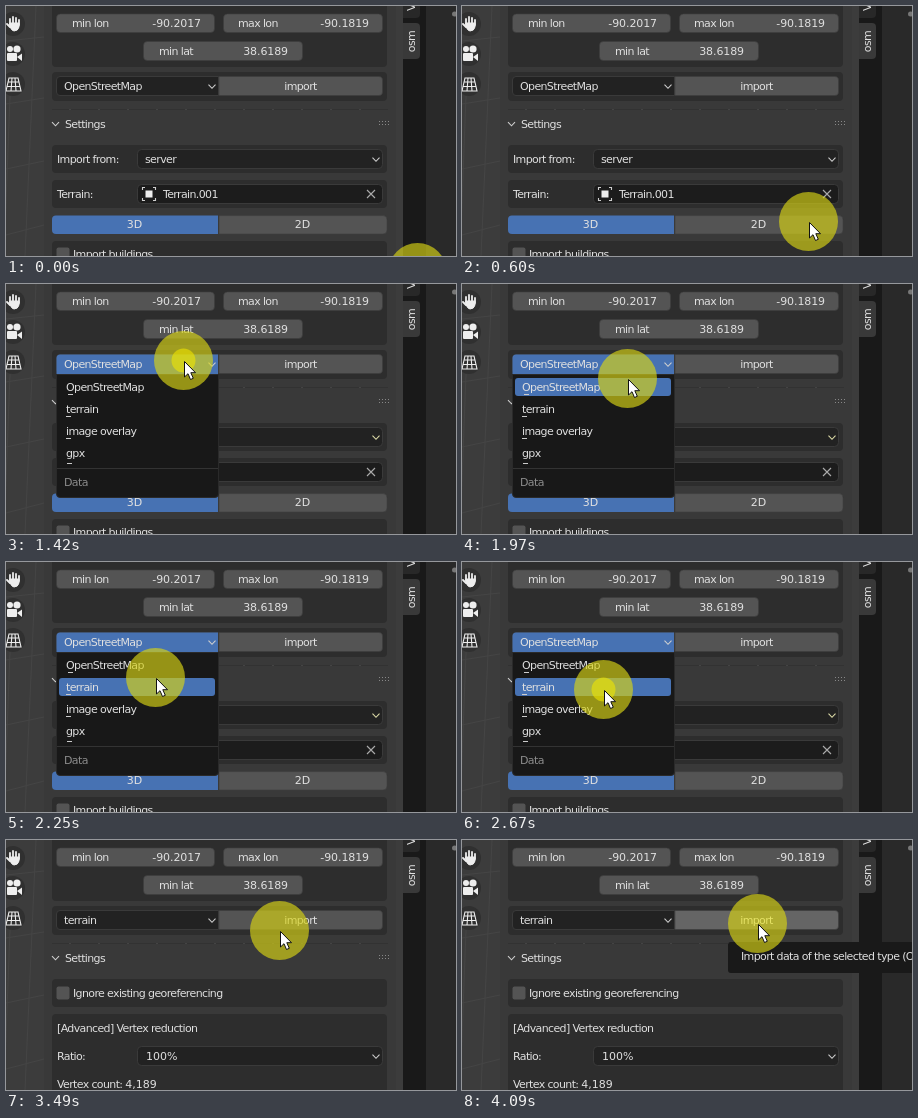
An HTML page for the animation above (4.69 s loop, 450x250 px).

```html
<!DOCTYPE html>
<html lang="en">
<head>
<meta charset="utf-8">
<title>Import panel</title>
<style>
html, body { margin: 0; width: 100%; height: 100%; overflow: hidden; background: #3b3b3b; }
svg { display: block; width: 450px; height: 250px; }
text { font: 11px "DejaVu Sans", sans-serif; letter-spacing: -.63px; fill: #e0e0e0; }
.num { letter-spacing: -.1px; text-anchor: end; }
.wide { letter-spacing: 0; }
.mid { text-anchor: middle; }
.dim { fill: #8c8c8c; }
.box { fill: #2d2d2d; }
.field { fill: #545454; stroke: #3d3d3d; stroke-width: .6; }
.drop { fill: #222; stroke: #3a3a3a; }
.blue { fill: #4772b3; }
.line { fill: none; stroke: #cfcfcf; stroke-width: 1.1; }
.spot { fill: #d8d416; fill-opacity: .66; }

/* One loop is 4690 ms; 1% = 46.9 ms */
.anim, .anim * { animation: 4690ms step-end infinite; }
.server { animation-name: server; }
.terrain { animation-name: terrain; }
.menu { animation-name: menu; }
.row1 { animation-name: row1; }
.row2 { animation-name: row2; }
.click { animation-name: click; }
.hover { animation-name: hover; }
.lit { animation-name: lit; }
.tip { animation-name: tip; }
.warm { animation-name: warm; }
.warmline { animation-name: warmline; }
.pointer { animation-name: move; }
.arrow { animation-name: lead; }

@keyframes server { 0% { opacity: 1 } 58.42%, 100% { opacity: 0 } }
@keyframes terrain { 0% { opacity: 0 } 58.42%, 100% { opacity: 1 } }
@keyframes menu { 0% { opacity: 0 } 30.27% { opacity: 1 } 58.42%, 100% { opacity: 0 } }
@keyframes row1 { 0% { opacity: 0 } 42% { opacity: 1 } 47.97%, 100% { opacity: 0 } }
@keyframes row2 { 0% { opacity: 0 } 47.97% { opacity: 1 } 58.42%, 100% { opacity: 0 } }
@keyframes click {
  0% { opacity: 0 } 30.27% { opacity: 1 } 31.76% { opacity: 0 }
  56.92% { opacity: 1 } 58.42%, 100% { opacity: 0 }
}
@keyframes hover { 0% { fill: #545454 } 75.9%, 100% { fill: #656565 } }
@keyframes lit { 0% { fill: #e0e0e0 } 75.9%, 100% { fill: #fff } }
@keyframes tip { 0% { opacity: 0 } 87.2%, 100% { opacity: 1 } }
@keyframes warm { 0% { fill: #e0e0e0 } 15.77%, 100% { fill: #f0efc8 } }
@keyframes warmline { 0% { stroke: #cfcfcf } 15.77%, 100% { stroke: #dedca8 } }
/* the arrow runs a little ahead of its halo */
@keyframes lead {
  0% { transform: none }
  15.77% { transform: translate(-4px, -4px) }
  17.27% { transform: translate(-3px, -3px) }
  18.76% { transform: translate(-2px, -2px) }
  20.25% { transform: none }
  68.44% { transform: translate(10px, 0) }
  69.93% { transform: translate(7px, -1px) }
  71.42% { transform: translate(4px, 0) }
  72.92%, 100% { transform: none }
}
@keyframes move {
  0% { transform: translate(411px, 266px) }
  5.54% { transform: translate(409px, 264px) }
  8.31% { transform: translate(400px, 257px) }
  9.8% { transform: translate(388px, 248px) }
  11.3% { transform: translate(371px, 235px) }
  12.79% { transform: translate(346px, 215px) }
  14.28% { transform: translate(312px, 188px) }
  15.77% { transform: translate(271px, 158px) }
  17.27% { transform: translate(232px, 126px) }
  18.76% { transform: translate(207px, 103px) }
  20.25% { transform: translate(191px, 88px) }
  21.74% { transform: translate(181px, 79px) }
  23.24% { transform: translate(177px, 76px) }
  37.52% { transform: translate(176px, 77px) }
  39.01% { transform: translate(174px, 81px) }
  40.51% { transform: translate(170px, 87px) }
  42% { transform: translate(165px, 94px) }
  43.49% { transform: translate(160px, 100px) }
  44.98% { transform: translate(156px, 105px) }
  46.48% { transform: translate(152px, 110px) }
  47.97% { transform: translate(149px, 115px) }
  49.46% { transform: translate(146px, 119px) }
  50.95% { transform: translate(144px, 122px) }
  52.45% { transform: translate(142px, 125px) }
  53.94% { transform: translate(141px, 126px) }
  55.43% { transform: translate(141px, 127px) }
  68.44% { transform: translate(153px, 126px) }
  69.93% { transform: translate(179px, 118px) }
  71.42% { transform: translate(212px, 108px) }
  72.92% { transform: translate(246px, 97px) }
  74.41% { transform: translate(273px, 90px) }
  75.9% { transform: translate(289px, 85px) }
  77.39%, 100% { transform: translate(295px, 83px) }
}
</style>
</head>
<body>
<svg viewBox="0 0 450 250">
  <defs>
    <path id="chev" d="M-3.5-1.8 0 1.8 3.5-1.8"/>
    <rect id="check" x="50.5" y=".5" width="13" height="13" rx="2" fill="#545454"/>
  </defs>

  <!-- viewport -->
  <rect width="450" height="250" fill="#3c3c3c"/>
  <path d="M0 35 38 31M0 98 38 92M0 163 38 155M0 229 38 219M30 0 19 250M4 90-2 250" stroke="#454545" fill="none"/>
  <g fill="#303030"><circle cx="7" cy="18" r="12"/><circle cx="7" cy="48" r="12"/><circle cx="7" cy="78" r="12"/></g>
  <g stroke="#eee" stroke-width="1.8" stroke-linecap="round" fill="none">
    <path d="M4 18V13M7 17V11M10 17V12M13 19V14M1 18 4 21"/>
    <path d="M4 17H13V21Q12 25 8 25 6 25 4 21Z" fill="#eee" stroke-width="1"/>
  </g>
  <g fill="#eee">
    <circle cx="4" cy="43" r="3"/><circle cx="11" cy="43" r="3.6"/>
    <rect x="1" y="47" width="10" height="8" rx="1"/><path d="M11 51 16 47.5V55Z"/>
  </g>
  <path d="M3 72H12L15 85H0ZM2 76H13M1 80.5H14M6 72 5 85M9 72 10 85" stroke="#eee" stroke-width="1.1" fill="none"/>

  <!-- sidebar and tabs -->
  <rect x="38" width="352" height="250" fill="#393939"/>
  <rect x="390" width="7" height="250" fill="#3c3c3c"/>
  <rect x="397" width="23" height="250" fill="#191919"/>
  <rect x="420" width="30" height="250" fill="#292929"/>
  <circle cx="448.500" cy="8" r="2.500" fill="#777"/>
  <path d="M397 0H414V8Q414 12 410 12H397Z" fill="#282828"/>
  <path d="M397 17H410Q414 17 414 21V49Q414 53 410 53H397Z" fill="#393939"/>
  <text transform="translate(409 5) rotate(-90)">View</text>
  <text class="mid" transform="translate(409 35.5) rotate(-90)">osm</text>

  <!-- coordinates -->
  <path class="box" d="M46 0H381V57Q381 61 377 61H50Q46 61 46 57Z"/>
  <g class="field">
    <rect x="50.5" y="8" width="158" height="18.5" rx="4"/>
    <rect x="217.5" y="8" width="159" height="18.5" rx="4"/>
    <rect x="137.5" y="35.5" width="159" height="19" rx="4"/>
  </g>
  <text x="66" y="21">min lon</text><text class="num" x="195" y="21">-90.2017</text>
  <text x="232" y="21">max lon</text><text class="num" x="363" y="21">-90.1819</text>
  <text x="153" y="49">min lat</text><text class="num" x="282" y="49">38.6189</text>

  <!-- data type and import -->
  <rect class="box" x="46" y="66" width="335" height="29" rx="4"/>
  <path class="drop" d="M212.5 70.5H54Q50.5 70.5 50.5 74V86Q50.5 89.5 54 89.5H212.5Z"/>
  <use href="#chev" class="line" x="206" y="80.5"/>
  <g class="anim">
    <path class="field hover" d="M213 70.5H373Q376.5 70.5 376.5 74V86Q376.5 89.5 373 89.5H213Z"/>
    <text class="mid lit" x="294.5" y="84">import</text>
  </g>

  <path d="M46 103.5H382" stroke="#323232"/>
  <path d="M63 103.5H382" stroke="#444" stroke-dasharray="2 27"/>
  <use href="#chev" class="line" x="49.5" y="118"/>
  <text x="59" y="122">Settings</text>
  <path d="M373 115.5H384M373 118.5H384" stroke="#888" stroke-dasharray="1 2"/>

  <g class="anim">
    <g class="server">
      <text x="58" y="84">OpenStreetMap</text>
      <rect class="box" x="46" y="139" width="335" height="28" rx="4"/>
      <rect class="drop" x="131.5" y="143.5" width="245" height="19" rx="4"/>
      <text x="51" y="157">Import from:</text>
      <text class="warm" x="139" y="157">server</text>
      <use href="#chev" class="line warmline" x="370" y="153.5"/>
      <rect class="box" x="46" y="174" width="335" height="28" rx="4"/>
      <rect x="131.5" y="178.5" width="245" height="19" rx="4" fill="#1c1c1c" stroke="#3a3a3a"/>
      <text x="51" y="192">Terrain:</text>
      <text x="157" y="192">Terrain.001</text>
      <rect x="139.5" y="184.5" width="7" height="7" fill="#eee"/>
      <path class="line" d="M136.5 184V181.5H139M147 181.5H149.5V184M149.5 192V194.5H147M139 194.5H136.5V192"/>
      <path class="line" d="M361 184 369 192M369 184 361 192" stroke-opacity=".8"/>
      <path class="blue" d="M50 209.6H212V228H50Q46 228 46 224V213.6Q46 209.6 50 209.6Z"/>
      <path class="field" d="M213 209.6H377Q381 209.6 381 213.6V224Q381 228 377 228H213Z"/>
      <text class="mid wide" x="128.5" y="222">3D</text>
      <text class="mid wide" x="296.5" y="222">2D</text>
      <rect class="box" x="46" y="235" width="335" height="20" rx="4"/>
      <use href="#check" y="241"/>
      <text x="67" y="252">Import buildings</text>
    </g>

    <g class="terrain">
      <text x="58" y="84">terrain</text>
      <rect class="box" x="46" y="139" width="335" height="28" rx="4"/>
      <use href="#check" y="146"/>
      <text x="67" y="157">Ignore existing georeferencing</text>
      <rect class="box" x="46" y="174" width="335" height="80" rx="4"/>
      <text x="51" y="192">[Advanced] Vertex reduction</text>
      <text x="51" y="220">Ratio:</text>
      <rect class="drop" x="131.5" y="206.5" width="245" height="19" rx="4"/>
      <text class="wide" x="140" y="220">100%</text>
      <use href="#chev" class="line" x="370" y="216.5"/>
      <text x="51" y="248">Vertex count: <tspan class="wide">4,189</tspan></text>
    </g>

    <g class="menu">
      <path class="blue" d="M212 70.5H54Q50.5 70.5 50.5 74V90H212Z"/>
      <use href="#chev" class="line" x="206" y="80.5"/>
      <text x="58" y="84">OpenStreetMap</text>
      <path d="M50.5 90.5H212.5V210Q212.5 213.5 209 213.5H54Q50.5 213.5 50.5 210Z" fill="#181818" stroke="#2a2a2a"/>
      <rect class="blue row1" x="53" y="94" width="156" height="18" rx="3"/>
      <rect class="blue row2" x="53" y="116" width="156" height="18" rx="3"/>
      <text x="60" y="107">OpenStreetMap</text>
      <text x="60" y="129">terrain</text>
      <text x="60" y="151">image overlay</text>
      <text x="60" y="173">gpx</text>
      <path d="M62 110.5H67M60 132.5H65M60 154.5H65M61 179.5H66" stroke="#ccc"/>
      <path d="M51 184.5H212" stroke="#333"/>
      <text class="dim" x="58" y="202">Data</text>
    </g>

    <g class="tip">
      <rect x="266" y="102" width="190" height="31" rx="3" fill="#191919"/>
      <text x="279" y="120">Import data of the selected type (OSM)</text>
    </g>

    <g class="pointer">
      <circle class="spot" cx=".5" cy=".5" r="29.5"/>
      <circle class="click" cx=".5" cy=".5" r="12" fill="#f0e600" fill-opacity=".6"/>
      <path class="arrow" d="M1.5 1.5V17L5 13.700 7.500 19.500 10.300 18.300 7.800 12.700H12.500Z" fill="#fff" stroke="#111"/>
    </g>
  </g>
</svg>
</body>
</html>
```
